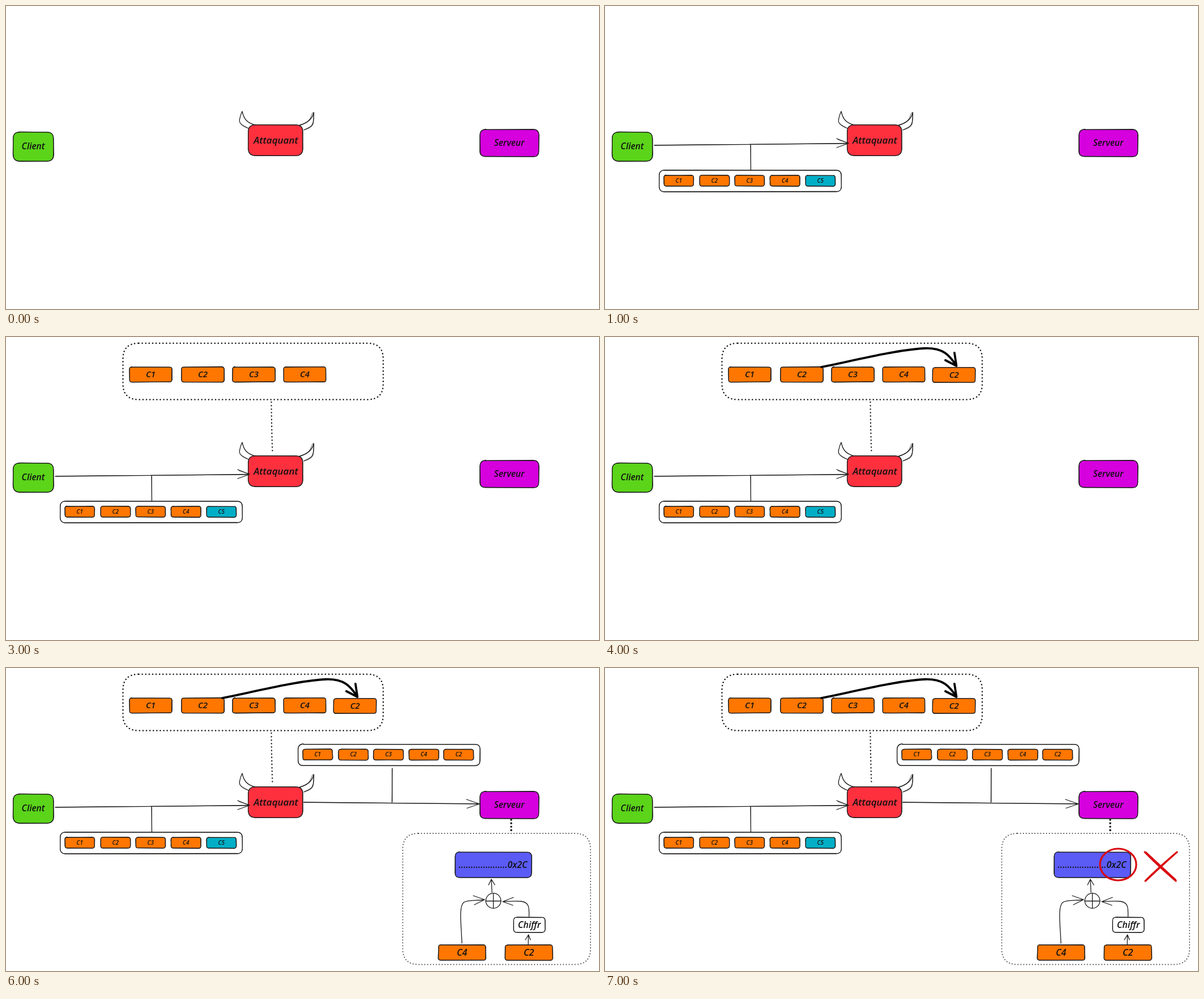
An HTML page for the animation above (8000 ms loop, 1047 by 535 pixels).

```html
<!DOCTYPE html>
<html lang="fr">
<head>
<meta charset="utf-8">
<title>Attaquant entre client et serveur</title>
<style>
  html, body { margin: 0; width: 100%; height: 100%; overflow: hidden; background: #fff; }
  svg { display: block; width: 1047px; height: 535px; }
  text { font-family: "Open Sans", "Noto Sans", sans-serif; font-style: italic; font-weight: 600;
         text-anchor: middle; fill: #111; stroke: none; }
</style>
</head>
<body>
<svg id="stage" viewBox="0 0 1047 535" fill="none" stroke="#1a1a1a" stroke-width="1.3"
     stroke-linecap="round" stroke-linejoin="round"></svg>
<script>
const LOOP = 8000;
const ORANGE = '#ff7600', TEAL = '#02aec6', RED = '#d90a0f';

let seed = 7;
const random = () => (seed = seed * 16807 % 2147483647) / 2147483647;
const jitter = (v, amount) => (v + (random() - 0.5) * 2 * amount).toFixed(1);

const path = (d, attrs = '') => `<path d="${d}" ${attrs}/>`;
const label = (x, y, size, text) =>
  `<text x="${x}" y="${y + size * 0.35}" font-size="${size}">${text}</text>`;

function roundRect(x1, y1, x2, y2, r, wobble = 0) {
  const p = (x, y) => `${jitter(x, wobble)},${jitter(y, wobble)}`;
  return `M${p(x1 + r, y1)}L${p(x2 - r, y1)}Q${x2},${y1} ${p(x2, y1 + r)}` +
    `L${p(x2, y2 - r)}Q${x2},${y2} ${p(x2 - r, y2)}` +
    `L${p(x1 + r, y2)}Q${x1},${y2} ${p(x1, y2 - r)}` +
    `L${p(x1, y1 + r)}Q${x1},${y1} ${p(x1 + r, y1)}Z`;
}

// A fill with two slightly uneven pen strokes around it
function box(x1, y1, x2, y2, r, fill = '#fff') {
  const outline = () => roundRect(x1, y1, x2, y2, r, 0.5);
  return path(roundRect(x1, y1, x2, y2, r), `fill="${fill}" stroke="none"`) +
    path(outline()) + path(outline(), 'stroke-width=".8"');
}

const dotted = (d, width, gap, color = '#1a1a1a') =>
  path(d, `stroke="${color}" stroke-width="${width}" stroke-dasharray=".1 ${gap}"`);

const block = (x1, y1, x2, y2, text, size, fill = ORANGE) =>
  box(x1, y1, x2, y2, 4, fill) + label((x1 + x2) / 2, (y1 + y2) / 2 - 0.5, size, text);

function packet(dx, dy, lastX, lastText, lastFill) {
  const small = (x, text, fill) =>
    block(x + dx, 299 + dy, x + dx + 52.5, 318 + dy, text, 10, fill);
  return box(96 + dx, 290 + dy, 417 + dx, 328 + dy, 9) +
    [104, 167, 229, 291.5].map((x, i) => small(x, 'C' + (i + 1))).join('') +
    small(lastX, lastText, lastFill);
}

const actors =
  path('M429,216.5C416,211 411,207 412.5,200Q414,192 417,186C420,199 424,206 442,211') +
  path('M517,211C532,207 541,199 543.5,188C543,208 545,213 526,219') +
  path('M519,210C532,206 536,203 541,189L543,188C544,207 542,212 527,218', 'stroke-width=".7"') +
  box(12.5, 222.5, 84, 274, 12, '#5bd41a') + label(48, 247.5, 15.5, 'Client') +
  box(428, 210, 524, 264, 12, '#ff303e') + label(476.5, 237, 17, 'Attaquant') +
  box(837, 218, 941, 266, 10, '#d500dd') + label(888.5, 242, 15.5, 'Serveur');

const clientPacket =
  path('M87,246L430,242.5M409,234L430,242.5L409,250M257,245L257.5,290') +
  path('M88,245.5L428,243M411,236L430,242M257.5,246V290', 'stroke-width=".7"') +
  packet(0, 0, 354, 'C5', TEAL);

const intercepted =
  dotted(roundRect(206.5, 11, 666, 110.5, 28), 2.5, 6) +
  dotted('M468.5,115Q469,165 470.5,204', 2.4, 6) +
  [218, 310, 400, 490].map((x, i) => block(x, 53, x + 75, 79.5, 'C' + (i + 1), 15)).join('');

const lastBlock = block(579.5, 53, 652.5, 80, 'C5', 15, TEAL);

const copiedBlock =
  block(578.5, 54, 654, 80, 'C2', 15) +
  path('M382,53C425,45 515,22 565,20C597,19 608,32 620,50M601,41L620.5,51L617,28',
    'stroke="#000" stroke-width="3.8"');

const forgedPacket =
  path('M526,237L836,240M813,232L836,240L814,247.5M682,177L681.5,237') +
  path('M525,237.5L834,239.5M681.5,179L682,236', 'stroke-width=".7"') +
  packet(420, -155.5, 353, 'C2', ORANGE);

const decryption =
  dotted('M892,268V288', 3.6, 6) +
  dotted(roundRect(700.5, 292, 1032, 523.5, 28), 1.9, 5, '#444') +
  box(793, 325, 928, 370, 8, '#5b5bf6') + label(860, 347, 16, '.'.repeat(20) + '0x2C') +
  '<circle cx="860.5" cy="411" r="13.3"/>' +
  path('M860.5,398V424M847,411.5H874') +
  path('M858,396L857,373M852,383L857,373L863,383') +
  path('M805,486C804,455 799,422 808,414C815,409 831,411 845,409M825,402L845,409L827,418') +
  path('M923.5,439C924,421 923,414 910,412C899,411 888,412 877,412.5M896,405L877,412.5L895,419') +
  path('M922,489L922.5,471M917,480L922.5,471L926,480') +
  box(896, 440, 952, 467, 6) + label(924, 453, 16, 'Chiffr') +
  block(763.5, 489, 847, 516, 'C4', 16) + block(881.5, 489, 965, 516, 'C2', 16);

const rejection =
  `<g stroke="${RED}" stroke-width="3.2">` +
  '<ellipse cx="906" cy="347" rx="32" ry="28"/>' +
  path('M953,325Q976,349 1008,376M1010,325Q978,352 954,376') +
  path('M955,325L1008,374M1009,326L956,375', 'stroke-width="2"') + '</g>';

// [markup, start, end] in ms
const layers = [
  [actors, 0, LOOP],
  [clientPacket, 1000, LOOP],
  [intercepted, 2000, LOOP],
  [lastBlock, 2000, 3000],
  [copiedBlock, 4000, LOOP],
  [forgedPacket, 5000, LOOP],
  [decryption, 6000, LOOP],
  [rejection, 7000, LOOP],
];

const stage = document.getElementById('stage');
stage.innerHTML = layers.map(([markup]) => `<g visibility="hidden">${markup}</g>`).join('');
const groups = [...stage.children];
const startTime = performance.now();

function draw(now) {
  const t = Math.max(0, now - startTime) % LOOP;
  layers.forEach(([, from, to], i) =>
    groups[i].setAttribute('visibility', t >= from && t < to ? 'visible' : 'hidden'));
  requestAnimationFrame(draw);
}
draw(startTime);
</script>
</body>
</html>
```
